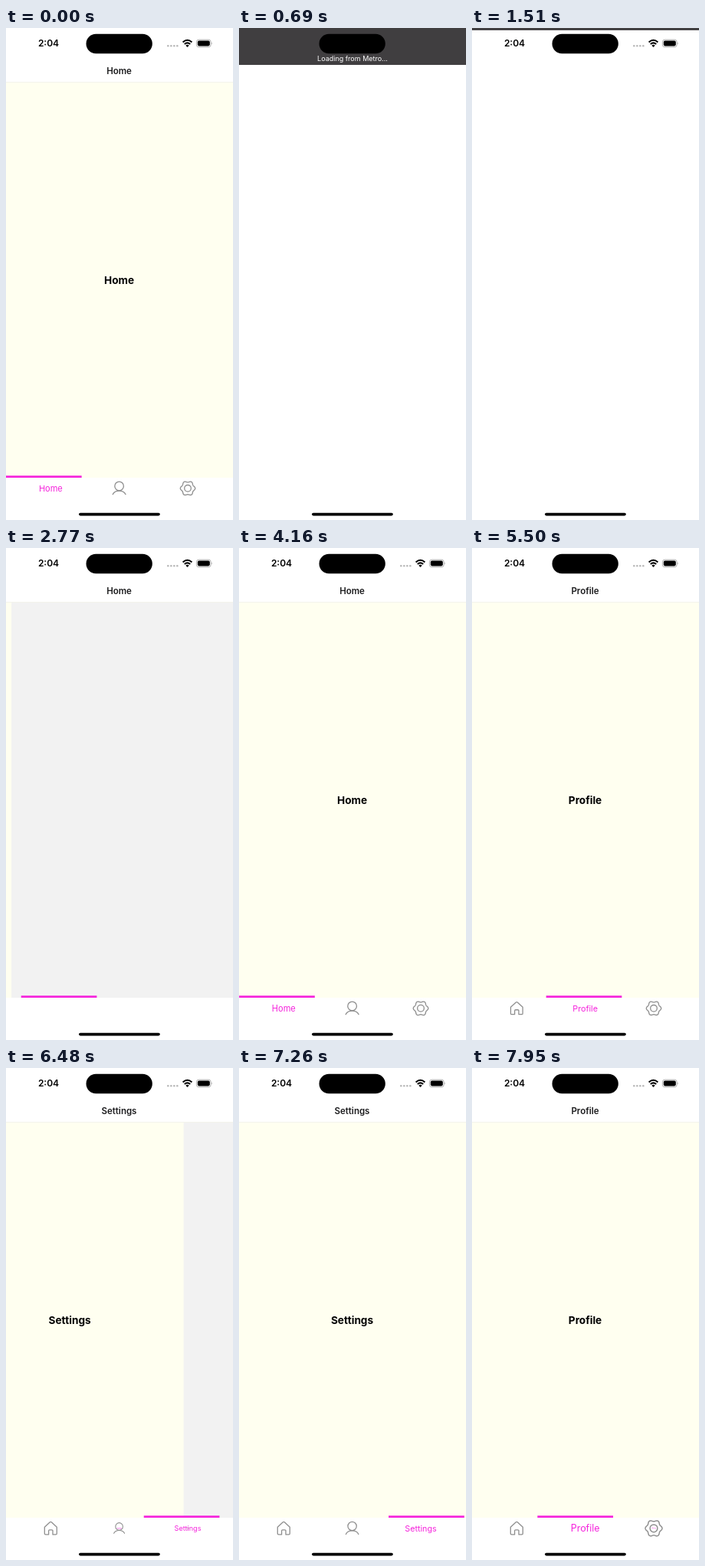
These frames come from a looping animation (296x640 px, 8 s). An HTML page:

```html
<!DOCTYPE html>
<html lang="en">
<head>
<meta charset="utf-8">
<title>Tab bar</title>
<style>
  html, body { margin: 0; width: 100%; height: 100%; overflow: hidden; background: #fff; }
  svg { display: block; width: 296px; height: 640px; font-family: Inter, "Liberation Sans", sans-serif; }
  text { text-anchor: middle; }
  .title { font-size: 11.5px; font-weight: 600; fill: #1c1c1e; }
  .big { font-size: 13.6px; font-weight: 700; }
  .label { font-size: 11px; fill: #f524dc; }
  .icon { fill: none; stroke: #8e8e8e; stroke-width: 1.3; stroke-linejoin: round; stroke-linecap: round; }
  .wifi { fill: none; stroke: #000; stroke-width: 2; }
  .note { font-size: 9px; fill: #fff; }
</style>
</head>
<body>
<svg viewBox="0 0 296 640">
  <rect width="296" height="640" fill="#fff"/>
  <g id="app">
    <rect y="70" width="296" height="515" fill="#f2f2f2"/>
    <g id="scene">
      <rect y="70" width="296" height="515" fill="#fffff0"/>
      <text id="big" class="big" x="147.5" y="333"></text>
    </g>
    <rect y="70" width="296" height="1" fill="#f3f3ec"/>
    <text id="title" class="title" x="147.5" y="60"></text>
    <g id="tabs"></g>
    <rect id="bar" y="582.3" width="98.7" height="2.7" fill="#f524dc"/>
  </g>

  <g id="status">
    <text x="55.5" y="24.4" font-size="12" font-weight="600">2:04</text>
    <g fill="#b9b9b9">
      <circle cx="211.3" cy="23.2" r="1.3"/><circle cx="215.3" cy="23.2" r="1.3"/>
      <circle cx="219.3" cy="23.2" r="1.3"/><circle cx="223.3" cy="23.2" r="1.3"/>
    </g>
    <path class="wifi" d="M230.6 18.6Q236.5 13 242.4 18.6M232.8 21.1Q236.5 17.7 240.2 21.1"/>
    <path d="M236.5 25L234.3 22.7Q236.5 20.9 238.7 22.7Z"/>
    <rect x="248.4" y="15.2" width="18.8" height="9.6" rx="3" fill="none" stroke="#a5a5a5" stroke-width=".9"/>
    <rect x="249.8" y="16.6" width="16" height="6.8" rx="1.8"/>
    <path d="M268.3 18.4Q270 20 268.3 21.6Z" fill="#a5a5a5"/>
  </g>
  <g id="banner">
    <rect width="296" height="48" fill="#403e40"/>
    <text class="note" x="148" y="43">Loading from Metro...</text>
  </g>
  <rect x="104.5" y="7.7" width="86.3" height="25.5" rx="12.75"/>
  <rect x="95" y="630.8" width="105.8" height="3.6" rx="1.8"/>
</svg>

<script>
const LOOP = 8000, W = 296, TAB = W / 3, MOUNT = 2770;
const names = ['Home', 'Profile', 'Settings'];
const centers = [58.3, 147.6, 237];
const $ = id => document.getElementById(id);

// Tab changes: bar spring start, page slide start, tab index.
const moves = [
  { at: 2550, slide: 2758, tab: 0 },
  { at: 4755, slide: 4735, tab: 1 },
  { at: 6250, slide: 6402, tab: 2 },
  { at: 7620, slide: 7603, tab: 1 }
];

// The picture only refreshes at these moments.
const spread = (a, b, n) => Array.from({ length: n }, (_, i) => a + (b - a) * i / (n - 1));
const ticks = [
  0, 500, 690, 1400, 1510, ...spread(2770, 3460, 7), 3670, 3820, 3940, 4160,
  ...spread(4850, 5600, 8), ...spread(5700, 5920, 3),
  ...spread(6150, 6910, 8), ...spread(7030, 7830, 8), 7950
];

const clamp = u => Math.min(1, Math.max(0, u));
const ease = u => u < .5 ? 2 * u * u : 1 - 2 * (1 - u) ** 2;

// Underdamped spring from 0 to 1.
function spring(ms) {
  if (ms <= 0) return 0;
  const s = ms / 1000, w = 7.36 * s;
  return 1 - Math.exp(-3.6 * s) * (Math.cos(w) + .49 * Math.sin(w));
}

function gearPath() {
  const pts = spread(0, 2 * Math.PI, 73).map(a => {
    const r = 8.8 + .9 * Math.cos(6 * a);
    return (r * Math.cos(a)).toFixed(2) + ' ' + (r * Math.sin(a)).toFixed(2);
  });
  return 'M' + pts.join('L') + 'Z';
}

const icons = [
  '<path d="M-8 -1.6L-1 -8Q0 -8.8 1 -8L8 -1.6V6.8Q8 8.1 6.7 8.1H2.7V3.2Q2.7 2 1.5 2H-1.5Q-2.7 2 -2.7 3.2V8.1H-6.7Q-8 8.1 -8 6.8Z"/>',
  '<circle cy="-2.9" r="5.8"/><path d="M-8.4 7.9C-5.6 1.7 5.6 1.7 8.4 7.9"/>',
  `<path d="${gearPath()}"/><circle r="4.3"/>`
];

$('tabs').innerHTML = names.map((name, i) => `
  <g transform="translate(${centers[i]} 598.8)">
    <g class="icon">${icons[i]}</g>
    <text class="label" y="4">${name}</text>
  </g>`).join('');
const tabs = [...$('tabs').children].map(g => ({ icon: g.children[0], label: g.children[1] }));

const show = (el, on) => el.setAttribute('visibility', on ? 'visible' : 'hidden');
const scale = (el, k) => el.setAttribute('transform', `scale(${k.toFixed(4)})`);

function drawApp(t) {
  let pos = 1, prev = 1, page = moves[0];
  const focus = [0, 0, 0];
  moves.forEach((m, i) => {
    const p = spring(t - m.at);
    pos += (m.tab - prev) * p;
    if (i) {
      focus[m.tab] += p;
      focus[prev] -= p;
    } else {
      focus[m.tab] = spring(t - MOUNT);
    }
    if (t >= m.slide) page = m;
    prev = m.tab;
  });

  const mount = spring(t - MOUNT);
  tabs.forEach((tab, i) => {
    scale(tab.label, focus[i]);
    scale(tab.icon, mount - focus[i]);
  });
  $('bar').setAttribute('x', pos * TAB);
  $('title').textContent = $('big').textContent = names[page.tab];
  const off = -W * (1 - ease(clamp((t - page.slide) / 110)));
  $('scene').setAttribute('transform', `translate(${off} 0)`);
}

function draw(now) {
  const time = now % LOOP;
  const t = ticks.filter(k => k <= time + .01).pop();
  const blank = t >= 500 && t < MOUNT;
  show($('app'), !blank);
  show($('banner'), t >= 690 && t < MOUNT);
  $('banner').setAttribute('transform', `translate(0 ${-48 * ease(clamp((t - 1302) / 252))})`);
  if (!blank) drawApp(t < 500 ? 4700 : t);
}

const start = performance.now();
function frame() {
  draw(performance.now() - start);
  requestAnimationFrame(frame);
}
frame();
</script>
</body>
</html>
```
